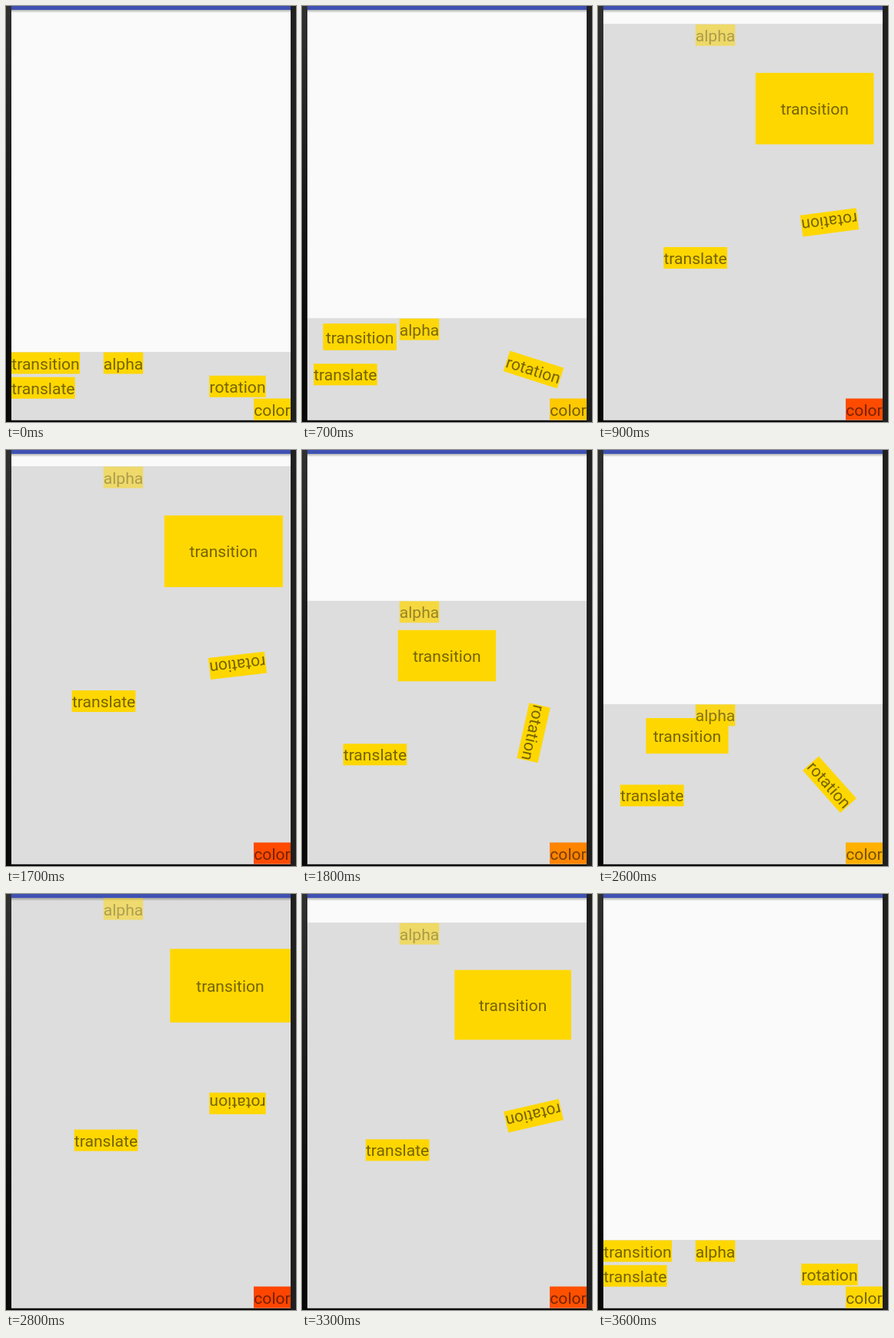
Write an HTML page with a canvas that moves like this. It is 377x540 px and loops after 4200 ms.

```html
<!DOCTYPE html>
<html lang="en">
<head>
<meta charset="utf-8">
<title>Sliding panel</title>
<style>
html, body { margin: 0; height: 100%; overflow: hidden; background: #000; }
canvas { display: block; }
</style>
</head>
<body>
<canvas id="stage" width="377" height="540"></canvas>
<script>
const ctx = document.getElementById('stage').getContext('2d');
const LOOP = 4200, STEP = 100, SLIDE = 300;
const LEFT = 7, RIGHT = 370, TOP = 5, BOTTOM = 537.5;
const CLOSED_TOP = 449, TRAVEL = CLOSED_TOP - TOP;
const GOLD = 'rgb(255,215,0)';

function slide(elapsed) {
  const t = Math.min(1, Math.max(0, elapsed / SLIDE));
  return (1 - Math.cos(Math.PI * t)) / 2;
}

// 0 = closed, 1 = fully open
function openness(time) {
  return slide(time - 639) - slide(time - 1663.5) + slide(time - 2496) - slide(time - 3248);
}

function verticalGradient(y0, y1, from, to) {
  const g = ctx.createLinearGradient(0, y0, 0, y1);
  g.addColorStop(0, from);
  g.addColorStop(1, to);
  return g;
}

function rect(x, y, w, h, fill) {
  ctx.fillStyle = fill;
  ctx.fillRect(x, y, w, h);
}

function label(text, cx, cy, w, { h = 28, fill = GOLD, angle = 0, alpha = 1 } = {}) {
  ctx.save();
  ctx.translate(cx, cy);
  ctx.rotate(angle);
  ctx.globalAlpha = alpha;
  rect(-w / 2, -h / 2, w, h, fill);
  ctx.fillStyle = 'rgba(0,0,0,.54)';
  ctx.fillText(text, 0, 8);
  ctx.restore();
}

function draw(p) {
  const panelTop = CLOSED_TOP - TRAVEL * p;

  rect(0, 0, 377, 540, '#000');
  rect(0, 0, LEFT, 540, verticalGradient(0, 430, '#303030', '#080808'));
  rect(RIGHT, 0, 7, 540, '#202020');
  rect(LEFT, 0, RIGHT - LEFT, BOTTOM, '#fafafa');
  rect(LEFT, panelTop, RIGHT - LEFT, BOTTOM - panelTop, '#ddd');
  rect(LEFT, 0, RIGHT - LEFT, TOP, '#3f51b5');
  rect(LEFT, TOP, RIGHT - LEFT, 4, verticalGradient(TOP, TOP + 4, 'rgba(0,0,0,.3)', 'rgba(0,0,0,0)'));

  ctx.font = '21.1px Roboto, sans-serif';
  ctx.textAlign = 'center';
  const grow = 67.5 * p;
  label('transition', 51.5 + 240 * p, 463.5 - 344.5 * p, 89 + grow, { h: 28 + grow });
  label('alpha', 152.5, panelTop + 14.5, 51.5, { alpha: 1 - p / 2 });
  label('translate', 48.3 + 81.7 * p, 495.7 - 176 * p, 82.7);
  label('rotation', 301, 493.8 - TRAVEL / 2 * p, 73.5, { angle: Math.PI * p });
  label('color', 346, 523.5, 48, { fill: `rgb(255,${Math.round(215 - 146 * p)},0)` });
}

function frame() {
  const time = performance.now() % LOOP;
  draw(openness(Math.floor(time / STEP) * STEP));
  requestAnimationFrame(frame);
}
frame();
</script>
</body>
</html>
```
